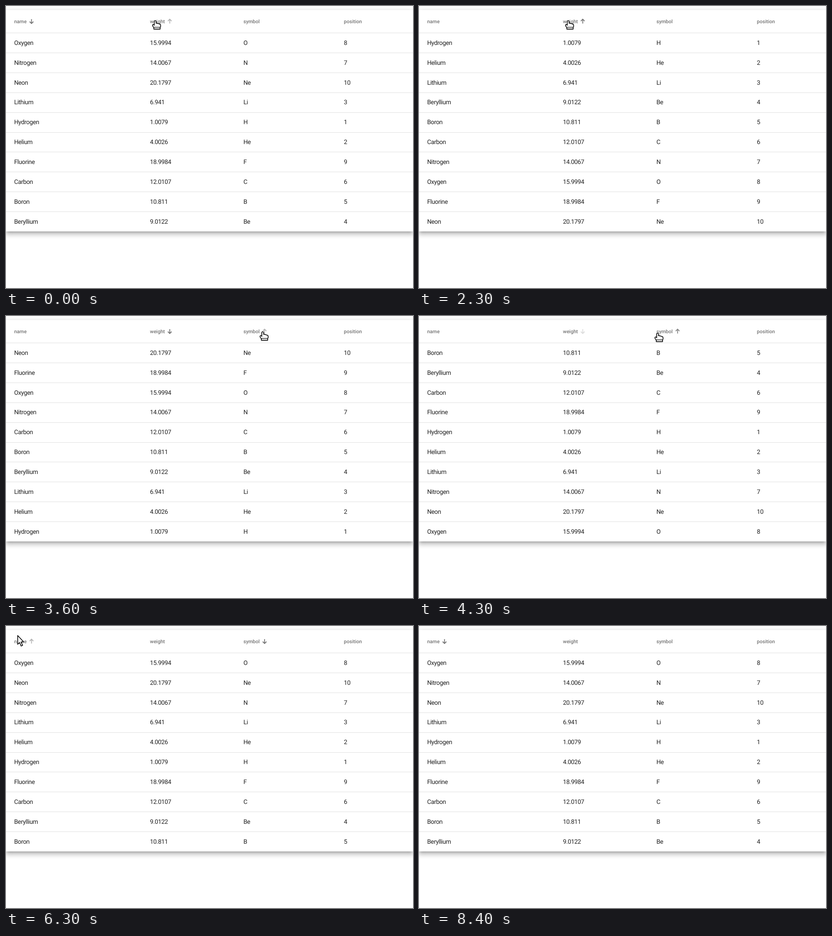
Recreate the animation shown at these times as an HTML page with a canvas. Size 899 by 623 pixels, loop 8700 ms.

```html
<!DOCTYPE html>
<html lang="en">
<head>
<meta charset="utf-8">
<title>Sortable table</title>
<style>
  html, body { margin: 0; width: 100%; height: 100%; overflow: hidden; background: #fff; }
  .stage { position: relative; width: 100%; height: 100%; overflow: hidden; contain: strict; }
  .card {
    position: absolute; left: 0; top: 9px; width: 100%; height: 489px; background: #fff;
    box-shadow: 0 4.6px 4.6px -2.7px rgba(0, 0, 0, .2),
                0 7.3px 9.1px .9px rgba(0, 0, 0, .14),
                0 2.7px 12.8px 1.8px rgba(0, 0, 0, .12);
  }
  canvas { position: absolute; left: 0; top: 0; display: block; }
</style>
</head>
<body>
<div class="stage">
  <div class="card"></div>
  <canvas id="view" width="899" height="623"></canvas>
</div>
<script>
const ctx = document.getElementById('view').getContext('2d');
const LOOP = 8700, STEP = 100, PITCH = 43.86;
const COLUMNS = { name: 18, weight: 318, symbol: 524.5, position: 746.3 };
const KEYS = Object.keys(COLUMNS);
const ELEMENTS = (
  'Hydrogen 1.0079 H,Helium 4.0026 He,Lithium 6.941 Li,Beryllium 9.0122 Be,Boron 10.811 B,' +
  'Carbon 12.0107 C,Nitrogen 14.0067 N,Oxygen 15.9994 O,Fluorine 18.9984 F,Neon 20.1797 Ne'
).split(',').map((line, i) => {
  const [name, weight, symbol] = line.split(' ');
  return { name, weight: +weight, symbol, position: i + 1 };
});

const SORTS = [
  { at: 0, key: 'name', dir: -1 },
  { at: 500, key: 'weight', dir: 1 },
  { at: 2400, key: 'weight', dir: -1 },
  { at: 4200, key: 'symbol', dir: 1 },
  { at: 4900, key: 'symbol', dir: -1 },
  { at: 7100, key: 'name', dir: 1 },
  { at: 7900, key: 'name', dir: -1 }
];
// Cursor moves: start, end, x and y of the tip
const HOME = [329.5, 31.5];
const MOVES = [
  [2600, 3600, 567, 34], [3600, 3700, 585, 32], [3700, 4000, 527, 37],
  [4900, 5200, 506.5, 38.5], [5200, 5700, 150, 10], [5700, 6100, 3, 31],
  [6100, 6300, 25, 20], [6300, 6800, 36, 26.5], [7900, 8400, 70, -40]
];
const HAND = new Path2D(
  'M-2 11V2.4Q-1.8.8 0 .8T2 2.4V6.6Q4.5 5.8 5.6 7.4Q8 6.8 9 8.4Q12 8 12 11V14' +
  'L11 16V19.6H-3V16.4L-5.6 12.6Q-6.4 9.6-4.4 9.2Q-3 9.2-2 11Z');
const POINTER = new Path2D(
  'M.8 1V20.5L5 16.6L8.4 24.3L11.7 22.8L8.3 15.4L13.8 15Z');

const sortAt = t => SORTS.filter(s => s.at <= t).pop();
const smooth = k => k * k * (3 - 2 * k);

function cursorAt(t) {
  let [x, y] = HOME;
  for (const [start, end, toX, toY] of MOVES) {
    const k = smooth(Math.min(1, Math.max(0, (t - start) / (end - start))));
    x += (toX - x) * k;
    y += (toY - y) * k;
  }
  return [x, y];
}

function hoveredAt(t) {
  const [x, y] = cursorAt(t);
  return y > 9 && y < 60 ? KEYS.filter((key, i) => !i || x > COLUMNS[key] - 20).pop() : null;
}

// Arrows fade because their strength is averaged over the last moments.
function arrowOpacity(key, t) {
  const strengths = [0, 50, 100, 150].map(lag => {
    const past = Math.max(0, t - lag);
    return sortAt(past).key === key ? 1 : hoveredAt(past) === key ? .54 : 0;
  });
  return strengths.reduce((a, b) => a + b) / strengths.length;
}

function arrowDir(key, t) {
  const sort = [sortAt(t), sortAt(Math.max(0, t - 150))].find(s => s.key === key);
  return sort ? sort.dir : 1;
}

function drawArrow(x, dir, opacity) {
  ctx.save();
  ctx.translate(x, dir > 0 ? 33.5 : 34.3);
  ctx.scale(1, dir);
  ctx.globalAlpha = opacity;
  ctx.strokeStyle = '#757575';
  ctx.lineWidth = 1.8;
  ctx.stroke(new Path2D('M0 5.3V-4.2M-4.2-.2L0-4.4L4.2-.2'));
  ctx.restore();
}

function drawHeader(t) {
  ctx.font = '500 11px Roboto, sans-serif';
  ctx.letterSpacing = '0px';
  ctx.fillStyle = '#757575';
  for (const key of KEYS) {
    ctx.fillText(key, COLUMNS[key], 38);
    const x = COLUMNS[key] + ctx.measureText(key).width + 10.8;
    drawArrow(x, arrowDir(key, t), arrowOpacity(key, t));
  }
}

function drawRows({ key, dir }) {
  const rows = [...ELEMENTS].sort((a, b) => (a[key] > b[key] ? 1 : -1) * dir);
  ctx.font = '13.6px Roboto, sans-serif';
  ctx.letterSpacing = '-0.4px';
  rows.forEach((row, i) => {
    ctx.fillStyle = '#e0e0e0';
    ctx.fillRect(0, Math.round(59.2 + PITCH * i), 899, 1);
    ctx.fillStyle = '#212121';
    for (const k of KEYS) ctx.fillText(row[k], COLUMNS[k], Math.round(85.9 + PITCH * i));
  });
}

function drawCursor([x, y]) {
  const overLabel = y >= 26 && x >= 18;
  const shape = overLabel ? HAND : POINTER;
  ctx.save();
  ctx.translate(x, y);
  ctx.lineJoin = 'round';
  ctx.lineWidth = 1.6;
  ctx.fillStyle = '#fff';
  ctx.strokeStyle = '#000';
  ctx.fill(shape);
  ctx.stroke(shape);
  if (overLabel) {
    ctx.fillStyle = '#bbb';
    for (let i = 0; i < 5; i++) ctx.fillRect(-1 + i * 2, 12, 1, 1);
    ctx.fillStyle = '#000';
    ctx.fillRect(-3, 15, 14, 1.2);
  }
  ctx.restore();
}

function draw(t) {
  ctx.clearRect(0, 0, 899, 623);
  ctx.textRendering = 'geometricPrecision';
  drawHeader(t);
  drawRows(sortAt(t));
  drawCursor(cursorAt(t));
}

const start = performance.now();
function tick() {
  const t = (performance.now() - start) % LOOP;
  draw(Math.floor(t / STEP) * STEP);
  requestAnimationFrame(tick);
}
tick();
</script>
</body>
</html>
```
